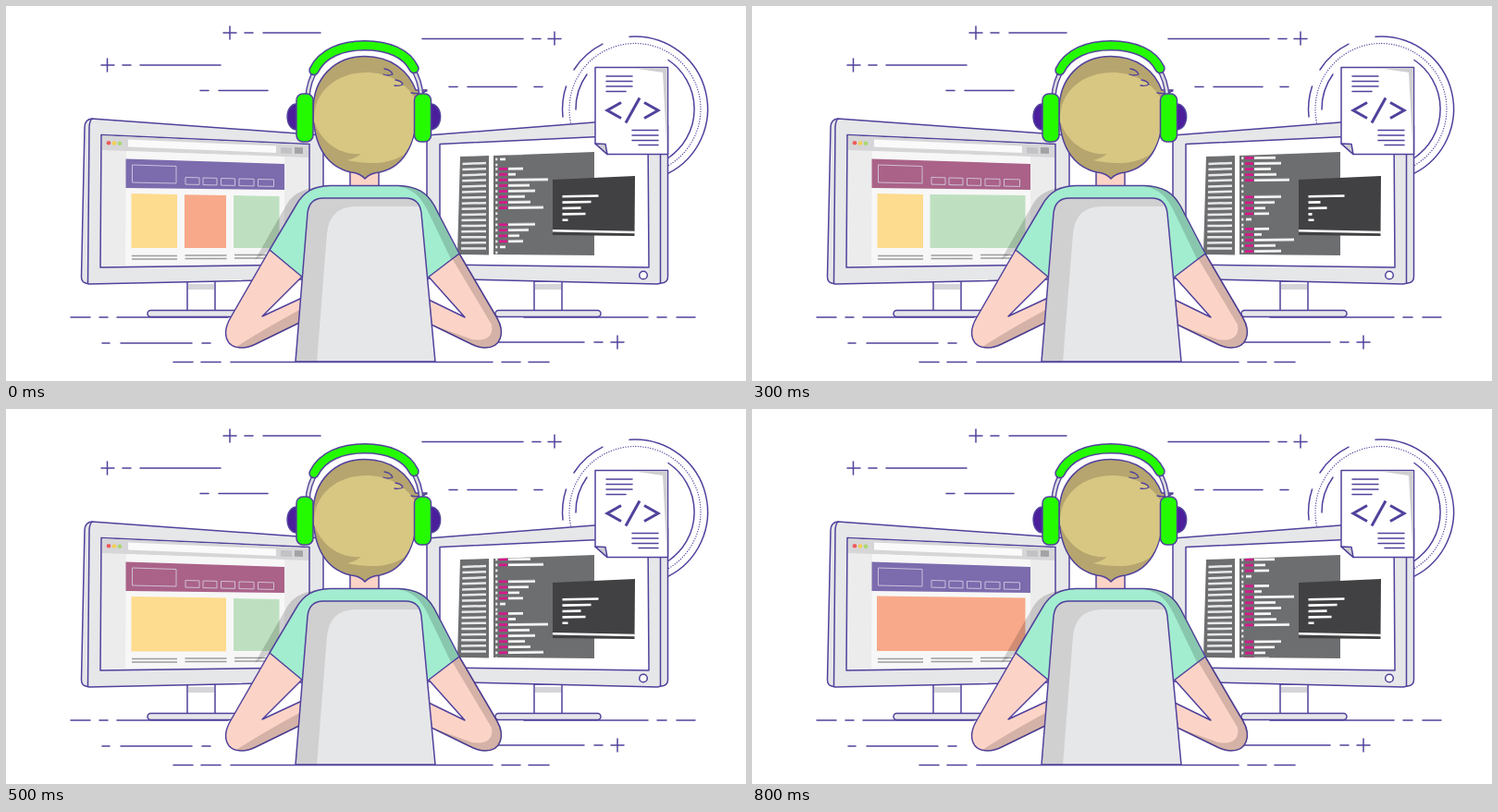
Recreate the animation shown at these times as an HTML page. Size 800x406 px, loop 0.9 s.

```html
<!DOCTYPE html>
<html lang="en">
<head>
<meta charset="utf-8">
<title>Developer at work</title>
<style>
  html, body { margin: 0; width: 100%; height: 100%; overflow: hidden; background: #fff; }
  svg { display: block; width: 100%; height: 100%; }
  .ink { stroke: #51419c; stroke-width: 1.5; stroke-linejoin: round; stroke-linecap: round; }
  .line { fill: none; }
  .case { fill: #e6e7e9; }
  .white { fill: #fff; }
  .skin { fill: #fcd4c7; }
  .shade { fill: #000; fill-opacity: .16; }
  .green { fill: #25fb00; }
  .yellow { fill: #fddc8f; }
  .orange { fill: #f8a98a; }
  .mint { fill: #bee0c0; }

  .banner, .page, .dip, .late, #code { animation: 900ms -1ms infinite step-end; }
  #code { animation-name: scroll; animation-timing-function: steps(9, end); }
  .banner { fill: #7c6bad; animation-name: recolor; }
  .page { visibility: hidden; }
  .three { animation-name: three; }
  .wide-right { animation-name: wide-right; }
  .wide-left { animation-name: wide-left; }
  .full { animation-name: full; }
  .dip { animation-name: dip; }
  .late { animation-name: late; }

  @keyframes scroll { to { transform: translateY(-89.6px); } }
  @keyframes recolor { 0%, 77.77% { fill: #7c6bad; } 33.33% { fill: #aa6288; } }
  @keyframes three { 0% { visibility: visible; } 33.33%, 100% { visibility: hidden; } }
  @keyframes wide-right { 0%, 55.55%, 100% { visibility: hidden; } 33.33% { visibility: visible; } }
  @keyframes wide-left { 0%, 77.77%, 100% { visibility: hidden; } 55.55% { visibility: visible; } }
  @keyframes full { 0% { visibility: hidden; } 77.77%, 100% { visibility: visible; } }
  @keyframes dip { 22.22% { width: var(--short); } 44.44% { width: var(--long); } }
  @keyframes late { 66.66% { width: var(--short); } 88.88% { width: var(--long); } }
</style>
</head>
<body>
<svg viewBox="0 0 800 406">
  <defs>
    <clipPath id="editor"><path d="M527 162L636 158V270L527 269Z"/></clipPath>
    <clipPath id="chair"><path d="M313 385L326 224Q328 208 343 208H432Q447 208 449 224L464 385Z"/></clipPath>
  </defs>

  <!-- Background strokes -->
  <path class="ink line" d="M235 29h14M242 22v14M258 29h9M278 29h62
    M103 64h14M109.500 57v14M126 64h9M145 64h87M210 91.500h9M230 91.500h53
    M450 35.500h109M569 35.500h9M586 35.500h14M593 28v14M479 87.500h9M499 87.500h53M571 87.500h9
    M70 337h21M101 337h9M120 337h120M560 337h134M704 337h10M725 337h20
    M104 365h8M124 365h77M212 365h9M530 364h95M636 364h9M654 364h14M661 357v14
    M181 385.500h21M211 385.500h21M243 385.500h283M536 385.500h20M565 385.500h22"/>
  <g class="ink line">
    <path d="M674 33.200A78.500 78.500 0 0 1 680 32.900A78.500 78.500 0 0 1 716 181.200
      M614 69A78.500 78.500 0 0 1 645 41.200M602 120A78.500 78.500 0 0 1 605.500 87"/>
    <path d="M616 112A64 64 0 0 1 628 74M716 58.500A64 64 0 0 1 716 164.500"/>
    <circle cx="680" cy="111.500" r="71" stroke-dasharray=".1 2.6" style="stroke-width:1.300"/>
  </g>

  <!-- Left monitor -->
  <g class="ink case">
    <path class="white" d="M196 298H226V330H196Z"/>
    <path d="M197 301H225V307H197Z" stroke="none" style="fill:#d5d4d8"/>
    <rect x="153" y="329.500" width="110" height="7" rx="3.500"/>
    <path d="M93 122Q85.500 122.500 85 131L81.500 293Q81.500 299 86 300L90 301L343 295.500V140Z"/>
    <path d="M93 122Q90.500 124 90 131L88.500 300.500" style="fill:none"/>
    <path d="M103 139.500L328 149.500V280L102 283Z" style="fill:#ececed"/>
  </g>
  <path d="M104 140.300L327 150.200V164L104 156Z" fill="#d6d6d8"/>
  <path d="M132 144.500L292 151.500V159L132 152.500Z" fill="#fafafa"/>
  <path d="M297 153L309 153.500V160L297 159.500Z" fill="#c2c2c4"/>
  <path d="M312 153L321 153.300V160L312 159.700Z" fill="#a3a3a6"/>
  <circle cx="111" cy="148.200" r="2.300" fill="#ef5b5b"/>
  <circle cx="117" cy="148.500" r="2.300" fill="#f3cf52"/>
  <circle cx="123" cy="148.800" r="2.300" fill="#a9d86e"/>
  <path d="M130 157L301 163V279L129 281Z" fill="#f7f7f7"/>
  <path class="banner" d="M129.500 165.500L301 171V199L129.500 197Z"/>
  <path d="M136.500 172L184 173.500V192L136.500 191Z
    M194 185.500l15 .4v7.500l-15 -.3ZM213 186l15 .4v7.500l-15 -.3ZM232.500 186.500l15 .4v7.500l-15 -.3Z
    M252 187l16 .4v7.500l-16 -.3ZM272.500 187.500l17 .4v7.500l-17 -.3Z" fill="none" stroke="#d3cae2" stroke-width=".9"/>
  <g class="page three">
    <path class="yellow" d="M135.500 203L185 204V262H135.500Z"/>
    <path class="orange" d="M193 204.300L238 205V262H193Z"/>
    <path class="mint" d="M246 205L295.500 206V262H246Z"/>
  </g>
  <g class="page wide-right">
    <path class="yellow" d="M135.500 203L185 204V262H135.500Z"/>
    <path class="mint" d="M192.500 204L295.500 205V262H192.500Z"/>
  </g>
  <g class="page wide-left">
    <path class="yellow" d="M135.500 203L238 204.500V262.500H135.500Z"/>
    <path class="mint" d="M246 205L295.500 206V262H246Z"/>
  </g>
  <path class="page full orange" d="M135 202.500L295.500 204.500V262H135Z"/>
  <path d="M136 270.500h49M136 274h49M193.500 270h45M193.500 273.500h45M247 269.500h45M247 273h45" stroke="#9d9da0" stroke-width="1.500"/>

  <!-- Right monitor -->
  <g class="ink case">
    <path class="white" d="M571 298H601V330H571Z"/>
    <path d="M572 301H600V307H572Z" stroke="none" style="fill:#d5d4d8"/>
    <rect x="529" y="329.500" width="114" height="7" rx="3.500"/>
    <path d="M455 140L706 120.500Q715.500 121 715.500 130V293Q715.500 298 711 299.500L704 301L455 295Z"/>
    <path d="M707.500 122V300" style="fill:none"/>
    <path d="M469 149.500L694 139L695 283L469 280Z" style="fill:#fff"/>
    <circle class="white" cx="689" cy="291.500" r="4.300"/>
  </g>
  <path d="M491 163L522 162V269.500L488 269Z" fill="#6d6e70"/>
  <g id="files" stroke="#e8e8e9" stroke-width="2.500"></g>
  <path d="M527 162L636 158V270L527 269Z" fill="#6d6e70"/>
  <g clip-path="url(#editor)">
    <g transform="translate(0 6.500) skewY(-.7)"><g id="code"></g></g>
  </g>
  <path d="M591 188L680 184L679.500 249L591 248Z" fill="#414042"/>
  <path d="M591 243.200L679.800 245" stroke="#fff" stroke-width="2.500"/>
  <g id="terminal" fill="#fff" transform="translate(0 10.500) skewY(-1)"></g>

  <!-- Document -->
  <path class="ink white" d="M637 66.500H715.500V160.500H650L637 149Z"/>
  <path d="M678 67.300H714.700V159L710 72Z" fill="#cfcfd1"/>
  <path class="ink" d="M637 149L648 149.500L650 160.500Z" fill="#cfcfd1"/>
  <path class="ink line" d="M649 76h28M649 81.500h28M649 87h28M649 92.500h21M677 134.500h28M677 140h28M677 145.500h28M684 150.500h21"/>
  <path class="ink line" d="M665 104.500L650 113L665 121.500M685 99.500L670 126.500M690 104.500L705 113L690 121.500" style="stroke-width:3;stroke-linecap:butt;stroke-linejoin:miter"/>

  <!-- Person -->
  <path class="shade" d="M335 196Q312 200 304 214L269 275L283 266L314 216Q322 201 335 197Z"/>
  <path class="ink skin" d="M372 175H403V197H372Z"/>
  <path class="ink skin" d="M285 264L243 337C233 354 237 370 255 370Q262 370 270 366L317 343L320 316L277 336L322 291Z"/>
  <path class="shade" d="M317 343L270 366Q259 371 249 369Q275 352 319 328Z"/>
  <path class="ink skin" d="M490 268L531 338C540 354 535 370 518 370Q511 370 503 366L460 345L457 318L496 337L455 291Z"/>
  <path class="shade" d="M490 268L531 338C540 354 535 370 518 370Q511 370 503 366L460 345L504 361Q528 364 525 345L482 273Z"/>
  <path class="ink" d="M350 194.500H424C444 195 455 202 463 216L490 268L456 294H321L285 264L314 215C322 201 333 195 350 194.500Z" fill="#a2edcf"/>
  <path class="shade" d="M424 195C444 195 455 202 463 216L489 268L481 274L456 222C449 207 440 198 424 195Z"/>

  <!-- Chair -->
  <g clip-path="url(#chair)">
    <path d="M300 200H470V390H300Z" fill="#d0d0d1"/>
    <path d="M336 386L347 246Q350 218 377 217H470V386Z" fill="#e6e7e9"/>
  </g>
  <path class="ink line" d="M313 385L326 224Q328 208 343 208H432Q447 208 449 224L464 385Z"/>

  <!-- Head -->
  <path class="ink" d="M388 187Q383 181 373 180C346 174 332 150 332 113C332 78 355 54.500 388 54.500C416 54.500 435 70 443 91L455 91Q449 96 444 98C447 145 432 174 404 180Q393 181 388 187Z" fill="#b6a56e"/>
  <path d="M333 125C332 92 358 72 389 72C412 72 432 82 443 101C445 128 440 150 430 161C412 173 388 171 369 167Q378 165 384 160C360 162 341 147 333 125Z" fill="#d7c783"/>
  <path class="ink line" d="M409 68Q416 69 418 74Q413 76 408 74M421 80Q428 81 429 85Q425 87 420 86M438 94Q446 96 455 92" style="stroke-width:1.300"/>

  <!-- Headphones -->
  <g class="line ink">
    <path d="M326 99Q327 81 336 68M449 99Q448 80 439 67" style="stroke-width:5.500"/>
    <path d="M326 99Q327 81 336 68M449 99Q448 80 439 67" style="stroke:#d9d9de;stroke-width:2.800"/>
    <path d="M333 69.500C342 51 363 42.700 388 42.700C413 42.700 433 51 441 67.500" style="stroke-width:11.500"/>
    <path d="M333 69.500C342 51 363 42.700 388 42.700C413 42.700 433 51 441 67.500" style="stroke:#25fb00;stroke-width:8.500"/>
  </g>
  <path class="ink" d="M315 106C301 105 300 134 315 134ZM458 106C473 105 474 134 458 134Z" fill="#4b1f9c"/>
  <rect class="ink green" x="314" y="95" width="18" height="52" rx="7"/>
  <rect class="ink green" x="441.500" y="95" width="18" height="52" rx="7"/>
</svg>
<script>
  const byId = id => document.getElementById(id);

  function add(parent, tag, attrs) {
    const el = document.createElementNS('http://www.w3.org/2000/svg', tag);
    for (const key in attrs) el.setAttribute(key, attrs[key]);
    parent.append(el);
    return el;
  }

  const bar = (parent, x, y, width, fill) =>
    add(parent, 'rect', { x, y: y - 1.3, width, height: 2.6, fill });

  for (let i = 0; i < 16; i++) {
    const y = 171 + i * 6.1;
    const tilt = 1 - i / 15;
    add(byId('files'), 'path', { d: `M${493.5 - i * .1} ${y}L519 ${y - tilt}` });
  }

  // Right end of each code row; 0 is an empty row, 540 a closing bracket.
  const rowEnds = [559, 551, 586, 566, 572, 561, 567, 581, 0, 0, 572, 565, 555, 559, 540, 0];
  const period = 95;
  const pitch = 6.04;
  for (const copy of [-1, 0, 1]) {
    rowEnds.forEach((end, i) => {
      const y = 176.4 + copy * period + i * pitch;
      const code = byId('code');
      bar(code, 529.3, y, 2, '#fff');
      if (end === 540) return bar(code, 534, y, 6, '#fff');
      if (!end) return;
      bar(code, 533, y, 9, '#d9158c');
      bar(code, 543, y, end - 543, '#fff');
    });
  }

  const commands = [[39, 13, 'late'], [31, 13, 'dip'], [20, 4, 'late'], [25, 4, 'dip'], [6, 6, 'dip']];
  commands.forEach(([long, short, motion], i) => {
    // The first bar shrinks with the third, the second and fourth shrink together.
    const el = bar(byId('terminal'), 601.5, 206.2 + i * 6.4, long);
    el.removeAttribute('fill');
    el.setAttribute('class', motion);
    el.style.cssText = `--long:${long}px;--short:${short}px`;
  });
</script>
</body>
</html>
```
